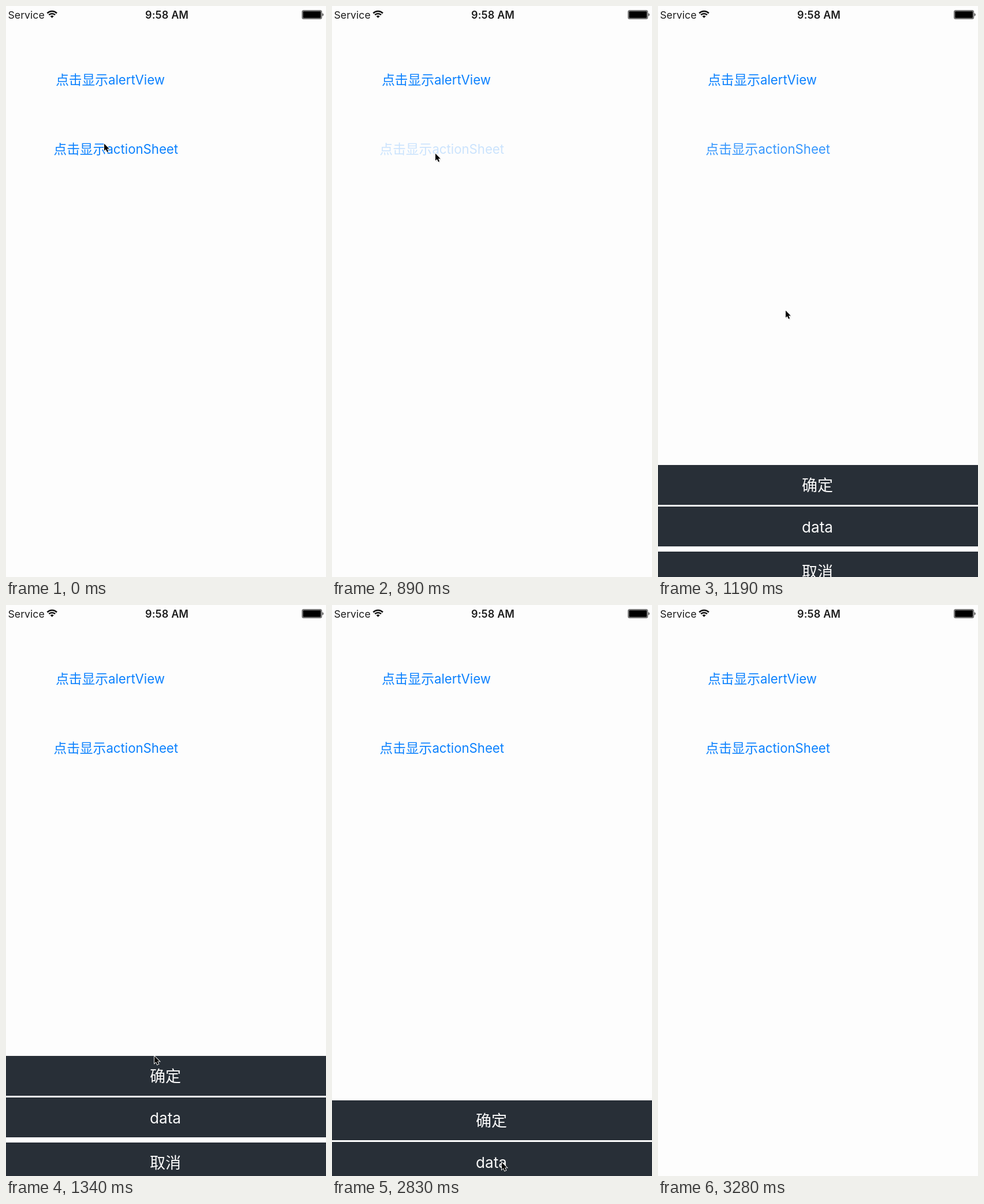
An HTML page that plays this animation: 554x989 px, repeating every 4180 ms.

```html
<!DOCTYPE html>
<html lang="zh">
<head>
<meta charset="utf-8">
<title>Action sheet</title>
<style>
  html, body { margin: 0; width: 100%; height: 100%; overflow: hidden; background: #fdfdfd; }
  svg { display: block; width: 100%; height: 100%; font-family: Inter, "Noto Sans CJK SC", "Noto Sans CJK", sans-serif; }
  .cjk { font-family: "Noto Sans CJK SC", "Noto Sans CJK", sans-serif; font-weight: 350; }
  .status { font-size: 17.7px; fill: #1c1c1c; }
  .clock { font-size: 18px; font-weight: 600; text-anchor: middle; letter-spacing: .15px; }
  .link { font-size: 22.2px; fill: #0a80fe; }
  .link .cjk { font-size: 22.7px; }
  .row rect { fill: #282f37; }
  .row text { font-size: 26px; fill: #fafafa; text-anchor: middle; }
  .row .cjk { font-size: 27px; }

  .pressed, .sheet, .cursor { animation: 4180ms step-end infinite; }
  .pressed { animation-name: press; }
  .sheet { animation-name: slide; }
  .cursor { animation-name: point; }

  @keyframes press {
    0% { opacity: 1; }
    21.291% { opacity: .2; }
    24.88% { opacity: .45; }
    28.468% { opacity: .82; }
    32.057%, 100% { opacity: 1; }
  }
  @keyframes slide {
    0% { transform: translateY(989px); }
    24.88% { transform: translateY(944px); }
    28.468% { transform: translateY(795px); }
    32.057% { transform: translateY(781px); }
    67.703% { transform: translateY(858px); }
    71.291%, 100% { transform: translateY(989px); }
  }
  @keyframes point {
    0% { transform: translate(169px, 237px); opacity: 1; }
    7.177% { transform: translate(179px, 261px); }
    10.526% { transform: translate(179px, 257px); }
    14.114% { transform: translate(178px, 254px); }
    28.468% { transform: translate(220px, 526px); }
    32.057% { transform: translate(256px, 780px); }
    35.645% { transform: translate(258px, 780px); }
    39.234% { transform: translate(293px, 959px); }
    42.583% { transform: translate(293px, 962px); }
    46.172% { transform: translate(293px, 964px); }
    71.291% { transform: translate(293px, 965px); opacity: 1; }
    78.468%, 100% { transform: translate(293px, 965px); opacity: 0; }
  }
</style>
</head>
<body>
<svg viewBox="0 0 554 989">
  <text class="status" x="3.5" y="21.7">Service</text>
  <g transform="translate(79.7 20.8)" fill="none" stroke="#111" stroke-width="2.5">
    <path d="M-8.3-8.3A11.7 11.7 0 0 1 8.3-8.3M-5.4-5.4A7.6 7.6 0 0 1 5.4-5.4"/>
    <path d="M0 0L-3-3A4.2 4.2 0 0 1 3-3Z" fill="#111" stroke="none"/>
  </g>
  <text class="status clock" x="278.6" y="21.7">9:58 AM</text>
  <rect x="512.7" y="7.7" width="33.8" height="14.6" rx="2.8" fill="#999" stroke="#707070" stroke-width="1.4"/>
  <rect x="514.3" y="9.3" width="30.6" height="11.4" rx="1.3"/>
  <path d="M547.6 12.2Q549.8 12.8 549.8 15T547.6 17.8Z" fill="#555"/>

  <g class="link">
    <text class="cjk" x="86.2" y="135.7">点击显示</text>
    <text x="177" y="135.7">alertView</text>
  </g>
  <g class="link pressed">
    <text class="cjk" x="82.5" y="255.7">点击显示</text>
    <text x="173.4" y="255.7">actionSheet</text>
  </g>

  <g class="sheet">
    <rect width="554" height="219" fill="#fff"/>
    <g class="row">
      <rect width="554" height="69"/>
      <text class="cjk" x="276" y="45">确定</text>
    </g>
    <g class="row" transform="translate(0 72)">
      <rect width="554" height="69"/>
      <text x="276" y="44.5">data</text>
    </g>
    <g class="row" transform="translate(0 150)">
      <rect width="554" height="69"/>
      <text class="cjk" x="276" y="45">取消</text>
    </g>
  </g>

  <g class="cursor">
    <path d="M2 3V16L5 13.3L7 18L9.2 17L7.2 12.6H11Z" fill="#000" opacity=".15"/>
    <path d="M1 1.5V13.8L3.8 11.2L6 16L8.2 15L6 10.4H9.8Z" stroke="#fff" stroke-width="1.8" paint-order="stroke"/>
  </g>
</svg>
</body>
</html>
```
